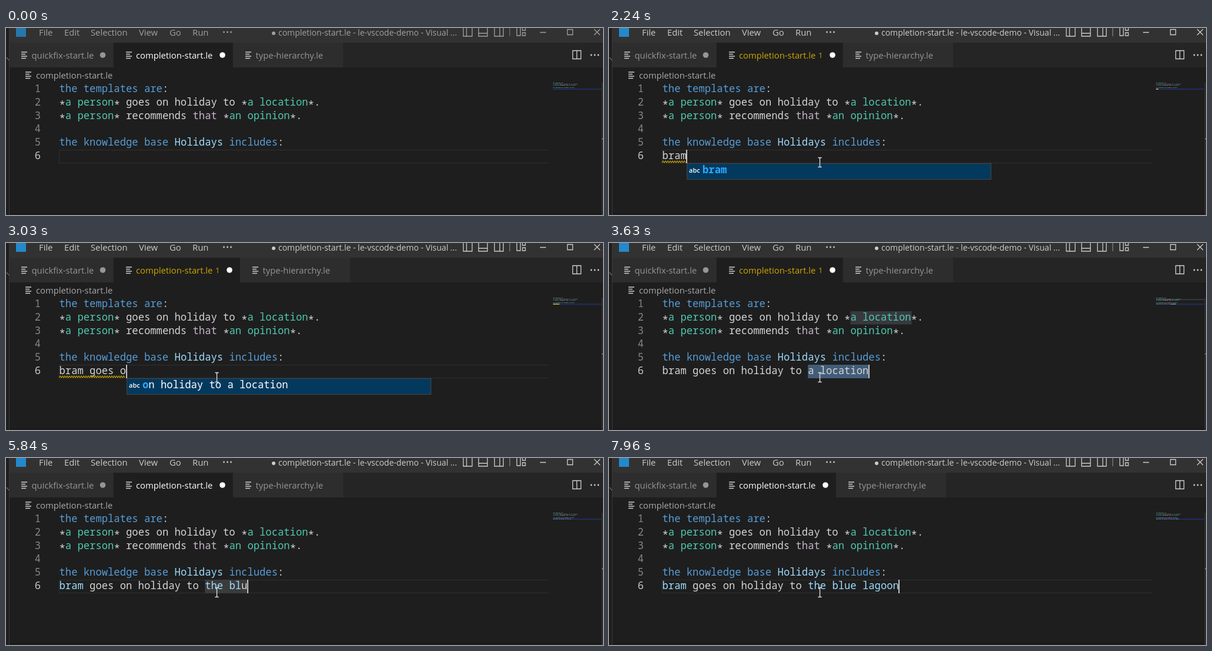
These frames come from a looping animation (1015 by 318 pixels, 8000 ms). An HTML page:

```html
<!DOCTYPE html>
<html lang="en">
<head>
<meta charset="utf-8">
<title>Completion demo</title>
<style>
html, body { margin: 0; width: 100%; height: 100%; overflow: hidden; background: #1e1e1e; }
svg { display: block; }
text { white-space: pre; font: 14.8px "Open Sans", "Noto Sans", sans-serif; }
.code text { font: 17.2px "Noto Sans Mono", "DejaVu Sans Mono", monospace; }
.line { fill: none; stroke: currentColor; stroke-width: 1.3; }
.mini { filter: brightness(1.7); }
</style>
</head>
<body>
<svg width="1015" height="318" viewBox="0 0 1015 318">
  <rect width="1015" height="318" fill="#1e1e1e"/>
  <rect x="6" y="25" width="1009" height="42" fill="#252526"/>
  <rect x="6" width="1009" height="25" fill="#323233"/>
  <path d="M5.5 0V318" stroke="#3a3a3a"/>
  <path d="M1 50l4 5" stroke="#999"/>
  <path d="M6 315.5H1015" stroke="#151515"/>
  <g id="title"></g>
  <g id="tabs"></g>
  <path d="M963.5 38.5h14v14h-14zM970.5 38.5v14" class="line" color="#d0d0d0"/>
  <g id="dots" fill="#d0d0d0"></g>
  <g id="crumb"></g>
  <g id="marks"></g>
  <g id="gutter" class="code"></g>
  <g id="code" class="code"><g id="fixed"></g><g id="typed"></g></g>
  <rect x="930" y="103" width="82" height="2" fill="#1e2e62"/>
  <g id="mini"></g>
  <use href="#code" class="mini" transform="translate(921.2 84.4) scale(.0969 .0877)"/>
  <path d="M1013.5 93V318" stroke="#3f3f3f"/>
  <path d="M1013 188.5h2" stroke="#aaa"/>
  <g id="over" class="code"></g>
  <path id="mouse" d="M-3 -8h2l1 1l1 -1h2M0 -7v14M-3 8h2l1 -1l1 1h2" class="line" color="#e4e4e4"/>
</svg>
<script>
const LOOP = 8000, CW = 10.32, LEFT = 90.5, ROW = 22.8;
const BLUE = "#569cd6", TEAL = "#4ec9b0", CYAN = "#9cdcfe", PLAIN = "#d4d4d4", WARN = "#cca700";
const NAME = "bram", HEAD = NAME + " goes on", PARAM = "the blue lagoon";
const FULL = HEAD + " holiday to ";
const HEAD_KEYS = [1690, 1890, 2040, 2240, 2370, 2440, 2500, 2640, 2770, 2900, 3030, 3160];
const PARAM_KEYS = [4820, 5090, 5160, 5230, 5430, 5560, 5840, 6370, 6500, 6700, 6840, 7040, 7370, 7500, 7700];
const ACCEPT = 3630, VALID = 3760, COLORED = 3960;

const cache = {};
function put(id, html) {
  if (cache[id] !== html) document.getElementById(id).innerHTML = cache[id] = html;
}
const text = (x, y, s, fill, extra = "") => `<text x="${x}" y="${y}" fill="${fill}" ${extra}>${s}</text>`;
const rect = (x, y, w, h, fill, extra = "") =>
  `<rect x="${x}" y="${y}" width="${w}" height="${h}" fill="${fill}" ${extra}/>`;
const dot = (x, y, r, fill) => `<circle cx="${x}" cy="${y}" r="${r}" fill="${fill}"/>`;
const dots = (x, y) => [0, 6, 12].map(d => dot(x + d, y, 1.4, "inherit")).join("");
const colX = n => LEFT + CW * n;
const baseline = row => 109 + Math.round(ROW * row);
const fileIcon = (x, y) =>
  `<path d="M${x} ${y}h10m-10 3.5h7m-7 3.5h10m-10 3.5h8" stroke="#d0d0d0" stroke-width="1.6"/>`;

// Code line from alternating text and colour; asterisks sit lower.
function codeLine(row, ...parts) {
  let col = 0, out = "";
  const y = baseline(row);
  for (let i = 0; i < parts.length; i += 2) {
    const s = parts[i];
    out += text(colX(col), s === "*" ? y + 4.5 : y, s, parts[i + 1]);
    col += s.length;
  }
  return out;
}

function titleBar(focused) {
  const c = focused ? "#cccccc" : "#a0a0a0";
  const menu = [[56, "File"], [99, "Edit"], [144, "Selection"], [226, "View"], [278, "Go"], [317, "Run"]];
  return rect(17, 0, 17, 15, "#2489ca", focused ? "" : 'opacity=".8"') +
    menu.map(([x, s]) => text(x, 13, s, c)).join("") +
    `<g fill="${c}">${dots(370.5, 7)}</g>` + dot(455, 9, 3, c) +
    text(463, 13, "completion-start.le - le-vscode-demo - Visual ...", c, 'style="font-size:14px"') +
    `<g class="line" color="${c}"><path d="M777.5 -1h15v15h-15zM783 0v14M803.5 -1h15v15h-15zM804 9h14
      M830.5 -1h15v15h-15zM839.5 0v14M868.5 -1h6v14h-6zM878 -1h5v5h-5zM878 8h5v5h-5z
      M908 7.5h10M954.5 2.5h9v9h-9zM1000 2l10 10m0 -10l-10 10"/><path d="M856.5 0v14" opacity=".5"/></g>`;
}

function tabBar(warn) {
  const shift = warn ? 12 : 0;
  return rect(6, 25, 176.5, 42, "#2d2d2d") + rect(183, 25, 202.5 + shift, 42, "#1e1e1e") +
    rect(386 + shift, 25, 187, 42, "#2d2d2d") +
    fileIcon(26, 41) + text(43.5, 52, "quickfix-start.le", "#969696") + dot(164.5, 46, 4.8, "#969696") +
    fileIcon(204, 41) + text(221, 52, "completion-start.le", warn ? WARN : "#ffffff") +
    (warn ? text(356, 51, "1", WARN, 'style="font-size:13px"') : "") + dot(368 + shift, 46, 4.8, "#ffffff") +
    fileIcon(407 + shift, 41) + text(424.5 + shift, 52, "type-hierarchy.le", "#969696");
}

function squiggle(n) {
  let d = "M90 229";
  for (let i = 0; i < n * CW / 4 - .5; i++) d += "l2 -3l2 3";
  return `<path d="${d}" fill="none" stroke="${WARN}" stroke-width="1.2"/>`;
}

function popup(x, label, match) {
  const bold = `<tspan fill="#2aaaff" font-weight="700">${label.slice(0, match)}</tspan>`;
  return rect(x + .5, 230.5, 517, 27, "#04395e", 'stroke="#454545"') +
    text(x + 4, 246, "abc", "#ffffff", `style="font:600 11px 'Open Sans',sans-serif"`) +
    text(x + 27, 247, bold + label.slice(match), "#ffffff");
}

function suggestion(s) {
  const word = s.slice(s.lastIndexOf(" ") + 1);
  if (s.length < 2 || !word) return null;
  if (s.length <= NAME.length) return [word, word.length];
  return [word[0] === "g" ? "goes" : "on holiday to a location", word.length];
}

function movePointer(t) {
  const el = document.getElementById("mouse");
  let x, y;
  if (t < 800) {
    const k = Math.min(2, Math.floor((t - 460) / 70));
    x = 1005 - 245 * k; y = 308 - 23 * k;
  } else {
    const k = Math.min(1, (Math.floor((t - 800) / 70) + 1) / 8), e = 1 - (1 - k) ** 2;
    x = 515 - 156.5 * e; y = 262 - 33.5 * e;
  }
  el.setAttribute("transform", `translate(${x} ${y})`);
  el.style.display = t < 460 ? "none" : "";
}

function render(t) {
  const count = keys => keys.filter(k => k <= t).length;
  const accepted = t >= ACCEPT, filling = t >= PARAM_KEYS[0];
  const selected = accepted && !filling;
  const start = accepted ? FULL : HEAD.slice(0, count(HEAD_KEYS));
  const param = filling ? PARAM.slice(0, count(PARAM_KEYS)) : accepted ? "a location" : "";
  const len = start.length + param.length, caret = Math.floor(colX(len));
  const bad = t >= 1890 && !accepted;

  put("title", titleBar(t >= 1490));
  put("tabs", tabBar(t >= 2040 && t < VALID));

  let marks = selected ? "" : `<path d="M923 207.5H90.5V229.5H923" fill="none" stroke="#2b2b2b" stroke-width="1.6"/>`;
  const px = colX(FULL.length);
  if (selected) marks += rect(410.5, 116, 104, 22.5, "#37393e") + rect(px, 207, CW * 10, 23, "#425d78");
  else if (filling && t < 7960) marks += rect(px, 207, CW * param.length, 23, "#3b3b3b");
  put("marks", marks);

  const fresh = t < 4890 || (t >= 5840 && t < 6170) ? 1 : 0;
  const done = filling ? param.length - fresh : 0;
  put("typed", codeLine(5, start.slice(0, 4), t >= COLORED ? CYAN : PLAIN, start.slice(4), PLAIN,
    param.slice(0, done), CYAN, param.slice(done), PLAIN));

  put("mini", bad ? rect(930, 103.3, len, 1.4, WARN) :
    selected ? rect(930, 95.5, 82, 1.5, "#3d4043") + rect(954, 103, 10, 2, "#425d78") : "");

  let over = bad ? squiggle(len) : "";
  const tip = bad && suggestion(start);
  if (tip) over += popup(caret + 1, ...tip);
  if (t >= 1490 && !(t >= 4090 && t < 4620)) over += rect(caret, 207, 2, 23, "#c4c3c1");
  put("over", over);
  movePointer(t);
}

put("dots", dots(995, 46));
put("crumb", fileIcon(33, 75) + text(51, 86, "completion-start.le", "#a9a9a9"));
put("gutter", [1, 2, 3, 4, 5, 6].map(n =>
  text(59, baseline(n - 1), n, n === 6 ? "#c6c6c6" : "#858585", 'text-anchor="end"')).join(""));
put("fixed",
  codeLine(0, "the templates are", BLUE, ":", PLAIN) +
  codeLine(1, "*", PLAIN, "a person", TEAL, "*", PLAIN, " goes on holiday to ", PLAIN,
    "*", PLAIN, "a location", TEAL, "*", PLAIN, ".", PLAIN) +
  codeLine(2, "*", PLAIN, "a person", TEAL, "*", PLAIN, " recommends ", PLAIN, "that ", "#c5b3c8",
    "*", PLAIN, "an opinion", TEAL, "*", PLAIN, ".", PLAIN) +
  codeLine(4, "the knowledge base ", BLUE, "Holidays", CYAN, " includes", BLUE, ":", PLAIN));

const begin = performance.now();
function frame() {
  render((performance.now() - begin) % LOOP);
  requestAnimationFrame(frame);
}
frame();
</script>
</body>
</html>
```
